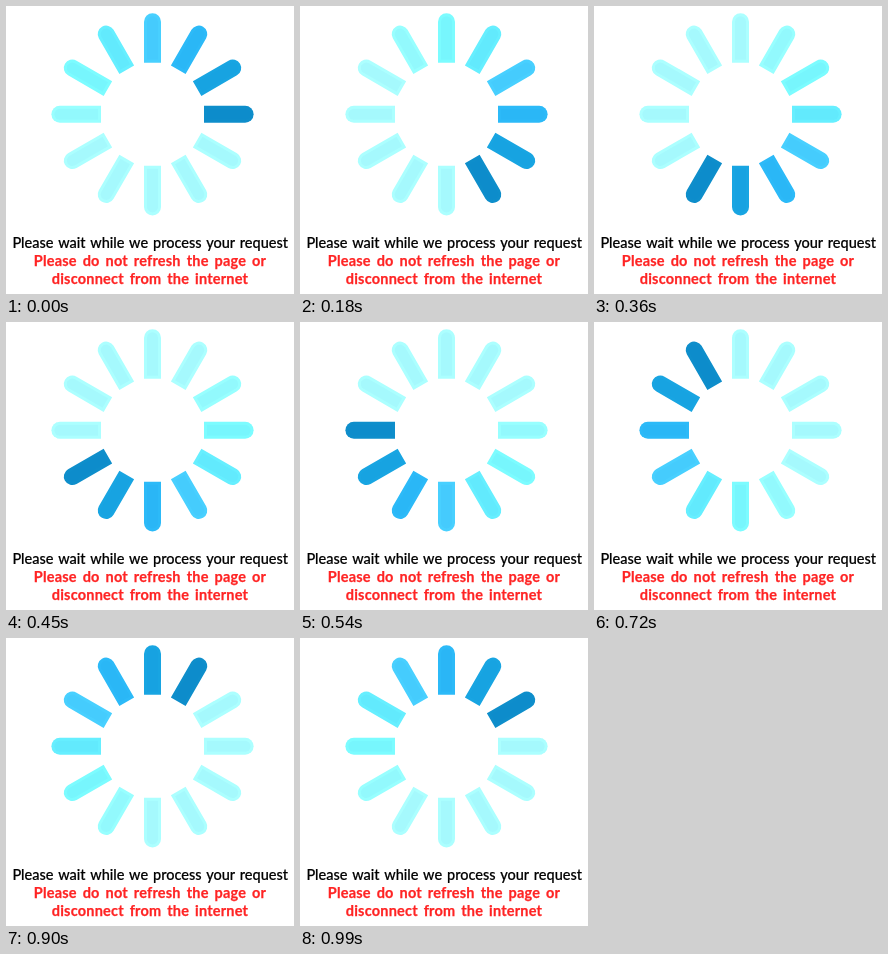
An HTML page for the animation above (1.08 s loop, 288 by 288 pixels).

```html
<!DOCTYPE html>
<html lang="en">
<head>
<meta charset="utf-8">
<title>Please wait</title>
<style>
  html, body { margin: 0; width: 100%; height: 100%; overflow: hidden; background: #fff; }
  svg { display: block; width: 100vw; height: 100vh; }
  text { font: 500 14.5px Lato, "Open Sans", sans-serif; text-anchor: middle; word-spacing: 1.3px; }
  .wait { stroke: #000; stroke-width: .2; }
  .note { fill: #ff2424; stroke: #ff2424; stroke-width: .25; font-weight: 700;
          letter-spacing: .2px; word-spacing: 2.2px; }
</style>
</head>
<body>
<svg viewBox="0 0 288 288">
  <filter id="soft" filterUnits="userSpaceOnUse" x="-110" y="-110" width="220" height="220"
          color-interpolation-filters="sRGB">
    <feGaussianBlur stdDeviation=".6"/>
  </filter>
  <g id="wheel" transform="translate(146.5 108.3)" filter="url(#soft)"></g>
  <text class="wait" x="144.2" y="242">Please wait while we process your request</text>
  <text class="note" x="144" y="260">Please do not refresh the page or</text>
  <text class="note" x="144" y="278">disconnect from the internet</text>
</svg>
<script>
  const COUNT = 12, STEP = 90;
  // Colours from the head of the sweep back along its tail.
  const TAIL = ['#0e8ecb', '#18a5e2', '#2cbaf8', '#48d0ff', '#66efff', '#7cfcff', '#98ffff'];
  const REST = '#acffff';
  const BAR = 'M51.5 -8.5H92.6A8.5 8.5 0 0 1 92.6 8.5H51.5Z';
  const CORE = 'M54.5 -5.5H92.6A5.5 5.5 0 0 1 92.6 5.5H54.5Z';

  const wheel = document.getElementById('wheel');

  function add(parent, name, attrs) {
    const node = document.createElementNS('http://www.w3.org/2000/svg', name);
    for (const key in attrs) node.setAttribute(key, attrs[key]);
    return parent.appendChild(node);
  }

  const bars = Array.from({ length: COUNT }, (_, i) => {
    const group = add(wheel, 'g', { transform: `rotate(${i * 360 / COUNT})` });
    const bar = add(group, 'path', { d: BAR });
    add(group, 'path', { d: CORE, fill: '#06c', 'fill-opacity': .04 });
    return bar;
  });

  function draw(time) {
    const head = Math.floor(time / STEP) % COUNT;
    bars.forEach((bar, i) => {
      const age = (head - i + COUNT) % COUNT;
      bar.setAttribute('fill', TAIL[age] || REST);
    });
  }

  const start = performance.now();
  function tick() {
    draw(performance.now() - start);
    requestAnimationFrame(tick);
  }
  tick();
</script>
</body>
</html>
```
